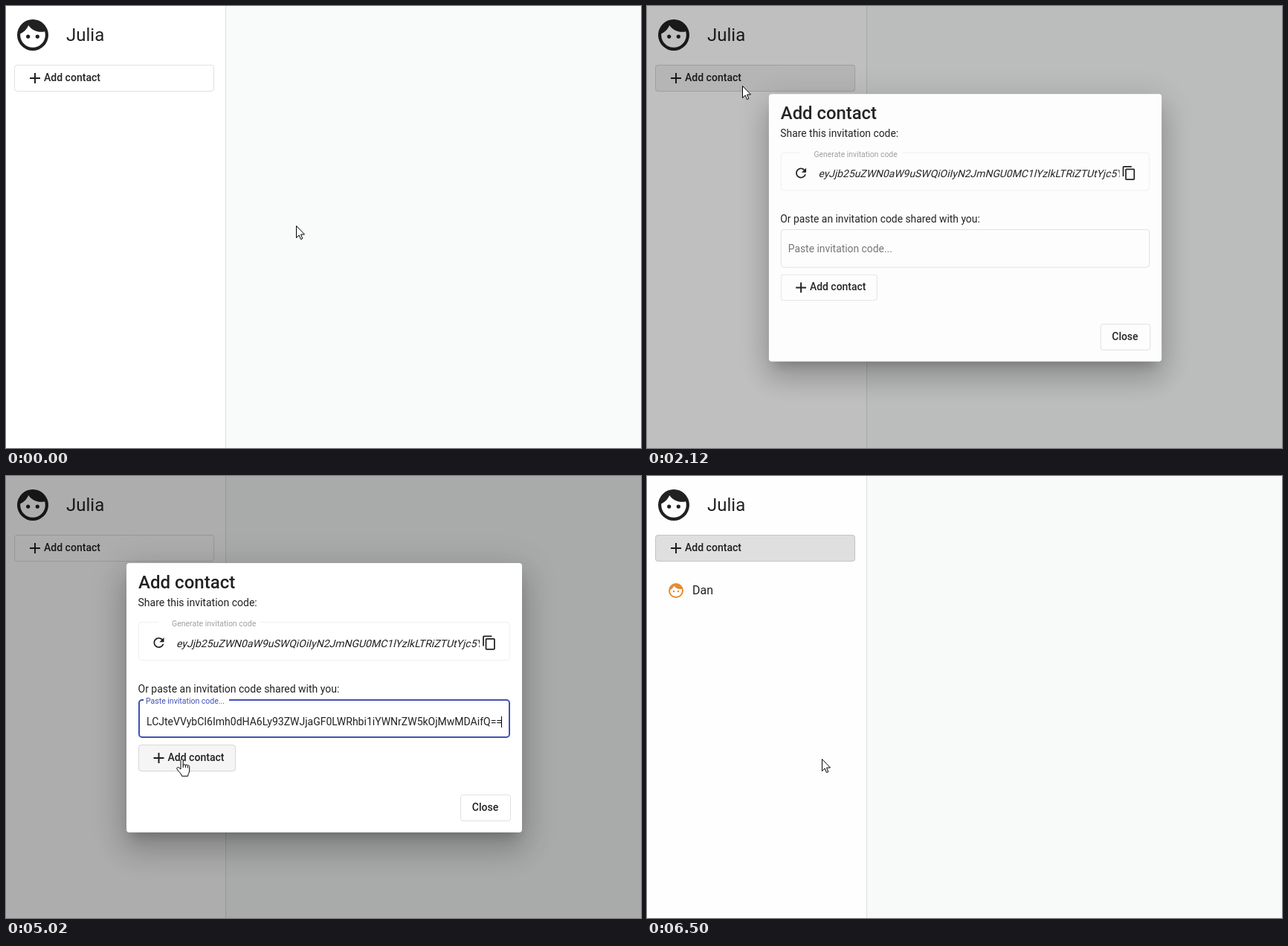
Animation of 854x594 px, one loop 8.3 s. Source, as an HTML page:

```html
<!DOCTYPE html>
<html lang="en">
<head>
<meta charset="utf-8">
<title>Add contact</title>
<style>
  html, body { margin: 0; width: 100%; height: 100%; overflow: hidden; background: #f9fafa; }
  body { position: relative; font: 14px Roboto, sans-serif; }
  body > svg, #backdrop { position: absolute; left: 0; top: 0; width: 854px; height: 594px; }
  #backdrop { background: #000; }
  #dialog {
    position: absolute; left: 162px; top: 117px; width: 532px; height: 362px;
    background: #fff; border-radius: 4px;
    box-shadow: 0 11px 15px -7px #0003, 0 24px 38px 3px #00000024, 0 9px 46px 8px #0000001f;
  }
  #dialog > svg { display: block; }
  text, .icon { fill: rgba(0, 0, 0, .87); }
  .strong { font-weight: 500; }
  .border { fill: none; stroke: rgba(0, 0, 0, .12); }
  .outline { fill: none; }
  #cursor path { fill: #fff; stroke: #000; stroke-linejoin: round; }
</style>
</head>
<body>
<svg viewBox="0 0 854 594">
  <defs>
    <path id="plus" d="M19 13h-6v6h-2v-6H5v-2h6V5h2v6h6v2z"/>
    <path id="face" d="M9 11.75a1.25 1.25 0 1 0 0 2.5 1.25 1.25 0 0 0 0-2.5zm6 0a1.25 1.25 0 1 0 0 2.5 1.25 1.25 0 0 0 0-2.5zM12 2a10 10 0 1 0 0 20 10 10 0 0 0 0-20zm0 18c-4.41 0-8-3.59-8-8 0-.29.02-.58.05-.86 2.36-1.05 4.23-2.98 5.21-5.37C11.07 8.33 14.05 10 17.42 10c.78 0 1.53-.09 2.25-.26.21.71.33 1.47.33 2.26 0 4.41-3.59 8-8 8z"/>
  </defs>
  <path fill="#fff" d="M0 0h295v594H0z"/>
  <path fill="#dedede" d="M295 0h1v594h-1z"/>
  <use href="#face" fill="#212121" transform="translate(10.8 13.8) scale(2.1)"/>
  <text x="81" y="47" font-size="24">Julia</text>
  <svg id="openButton" x="11" y="79" width="269" height="36">
    <rect class="overlay" width="269" height="36" rx="4"/>
    <circle class="ripple" cx="117" cy="28"/>
    <rect class="border" x=".5" y=".5" width="268" height="35" rx="3.5"/>
    <use href="#plus" class="icon" x="16" y="6"/>
    <text class="strong" x="40" y="22">Add contact</text>
  </svg>
  <g id="contact">
    <use href="#face" fill="#e88c30" x="27" y="142"/>
    <text x="61" y="159" font-size="16">Dan</text>
  </g>
</svg>

<div id="backdrop"></div>

<div id="dialog">
  <svg viewBox="162 117 532 362" width="532" height="362">
    <text class="strong" x="178" y="151" font-size="24">Add contact</text>
    <text x="177.5" y="175">Share this invitation code:</text>

    <path id="codeOutline" class="outline" stroke="rgba(0,0,0,.06)"/>
    <text x="223" y="202" font-size="10.5" style="fill:rgba(0,0,0,.38)">Generate invitation code</text>
    <path class="icon" transform="translate(195 213.5) scale(.875)" d="M17.65 6.35C16.2 4.9 14.21 4 12 4c-4.42 0-7.99 3.58-7.99 8s3.57 8 7.99 8c3.73 0 6.84-2.55 7.73-6h-2.08c-.82 2.33-3.04 4-5.65 4-3.31 0-6-2.69-6-6s2.69-6 6-6c1.66 0 3.14.69 4.22 1.78L13 11h7V4l-2.35 2.35z"/>
    <svg x="226" y="210" width="411" height="30">
      <!-- slanted upright face, not the narrower true italic -->
      <text transform="translate(3 20) skewX(-14)">eyJjb25uZWN0aW9uSWQiOiIyN2JmNGU0MC1lYzlkLTRiZTUtYjc5Yi</text>
    </svg>
    <path class="icon" transform="translate(639.4 213.5) scale(.875)" d="M16 1H4c-1.1 0-2 .9-2 2v14h2V3h12V1zm3 4H8c-1.1 0-2 .9-2 2v14c0 1.1.9 2 2 2h11c1.1 0 2-.9 2-2V7c0-1.1-.9-2-2-2zm0 16H8V7h11v14z"/>

    <text x="177.5" y="291">Or paste an invitation code shared with you:</text>
    <path id="thinOutline" class="outline" stroke="rgba(0,0,0,.12)"/>
    <path id="thickOutline" class="outline" stroke-width="2"/>
    <text id="label">Paste invitation code...</text>
    <svg x="188" y="315" width="479" height="30">
      <text id="codeStart" y="20">eyJjb25uZWN0aW9uSWQiOiJiMmZiZmVkNi1jYTQ4LTQ3NjMtOWM1YS03YWQx</text>
      <text id="codeEnd" x="479" y="20" text-anchor="end">iLCJteVVybCI6Imh0dHA6Ly93ZWJjaGF0LWRhbi1iYWNrZW5kOjMwMDAifQ==</text>
    </svg>
    <rect id="caret" y="323" width="1" height="15"/>

    <svg id="addButton" x="178" y="361" width="131" height="36">
      <rect class="overlay" width="131" height="36" rx="4"/>
      <circle class="ripple" cx="59" cy="20"/>
      <rect class="border" x=".5" y=".5" width="130" height="35" rx="3.5"/>
      <use href="#plus" class="icon" x="15.5" y="6"/>
      <text class="strong" x="39.5" y="22">Add contact</text>
    </svg>
    <rect class="border" x="611.5" y="428.5" width="67" height="35" rx="3.5"/>
    <text class="strong" x="644.5" y="450" text-anchor="middle">Close</text>
  </svg>
</div>

<svg viewBox="0 0 854 594">
  <g id="cursor">
    <path id="arrow" d="M.5 .5V16.5L4.2 13 6.5 18.5 8.8 17.6 6.6 12H11.5z"/>
    <path id="hand" d="M0 14V2.2a1.6 1.6 0 0 1 3.2 0V9c.3-1.8 3-1.8 3.2 0 .3-1.5 2.7-1.3 2.9.5 .3-1.2 2.4-1 2.4 1V16c0 3-2 4-2 7.3H1.5C1 20-3 17.5-5 13.8-6 11.8-3.6 10.8-2.2 12zM3.2 9v3M6.4 9v3M9.3 9.5v3"/>
    <path id="beam" style="fill:none" d="M-3-7.5H-.5L.5-6.5 1.5-7.5H4M.5-6.5V6.5M-3 7.5H-.5L.5 6.5 1.5 7.5H4"/>
  </g>
</svg>

<script>
const LOOP = 8300;
const CLICK_OPEN = 1830, OPEN = 2001, FOCUS = 3100, PASTE = 3830, BLUR = 5940, CLOSE = 6186, CLOSED = 6262;

// The screen refreshes in bursts: [first, last, count]
const bursts = [[680, 1520, 13], [1850, 2680, 13], [2750, 2970, 4], [3110, 3870, 10],
  [4400, 5020, 9], [5420, 5420, 1], [5950, 6500, 9]];
const refreshes = [0, ...bursts.flatMap(([first, last, count]) =>
  Array.from({ length: count }, (_, i) =>
    first + Math.floor(i * (last - first) / Math.max(1, count - 1) / 10) * 10))];

// [time, x, y]
const pointerPath = [[640, 390, 295], [1450, 128, 107], [2150, 128, 107], [2680, 225, 300],
  [2970, 234, 332], [4340, 234, 332], [5020, 235, 380], [LOOP, 235, 380]];

const $ = id => document.getElementById(id);
const clamp = v => Math.min(1, Math.max(0, v));
const mix = (a, b, p) => a + (b - a) * p;

function bezier(x1, y1, x2, y2) {
  const at = (a, b, s) => 3 * (1 - s) ** 2 * s * a + 3 * (1 - s) * s * s * b + s ** 3;
  return x => {
    let low = 0, high = 1;
    for (let i = 0; i < 24; i++) {
      const mid = (low + high) / 2;
      if (at(x1, x2, mid) < x) low = mid; else high = mid;
    }
    return at(y1, y2, high);
  };
}
const swift = bezier(.25, .8, .25, 1);
const decelerate = bezier(0, 0, .2, 1);
const standard = bezier(.4, 0, .2, 1);
const smooth = bezier(.4, 0, .6, 1);
const tween = (t, start, duration, ease = swift) => ease(clamp((t - start) / duration));

function outline(x, y, w, h, inset, gapStart, gapEnd) {
  const r = 4, left = x + inset, top = y + inset, right = x + w - inset, bottom = y + h - inset;
  return `M${gapEnd} ${top}H${right - r}a4 4 0 0 1 4 4V${bottom - r}a4 4 0 0 1-4 4` +
    `H${left + r}a4 4 0 0 1-4-4V${top + r}a4 4 0 0 1 4-4H${gapStart}`;
}

function drawButton(button, t, shade, press, radius) {
  button.querySelector(".overlay").setAttribute("opacity", shade);
  const ripple = button.querySelector(".ripple");
  ripple.setAttribute("r", radius * tween(t, press, 225, decelerate));
  ripple.setAttribute("opacity", t < press ? 0 : .1 * (1 - tween(t, press + 225, 400, decelerate)));
}

function drawField(t) {
  const focused = t >= FOCUS && t < BLUR;
  const floating = tween(t, FOCUS, 400);
  const gapEnd = t >= FOCUS ? 300 : 185;
  const thick = tween(t, 2700, 250) * (1 - tween(t, BLUR, 200));
  $("thinOutline").setAttribute("d", outline(178, 300, 500, 52, .5, 185, gapEnd));
  $("thinOutline").setAttribute("opacity", 1 - thick);
  $("thickOutline").setAttribute("d", outline(178, 300, 500, 52, 1, 185, gapEnd));
  $("thickOutline").setAttribute("stroke", t < FOCUS ? "rgba(0,0,0,.87)" : "#3f51b5");
  $("thickOutline").setAttribute("opacity", thick);

  $("label").setAttribute("transform",
    `translate(188 ${mix(331, 306, floating)}) scale(${mix(1, .75, floating)})`);
  $("label").style.fill = focused ? "#3f51b5" : "rgba(0,0,0,.54)";
  $("codeEnd").setAttribute("opacity", +(t >= PASTE && t < BLUR));
  $("codeStart").setAttribute("opacity", +(t >= BLUR));

  const pasted = t >= PASTE;
  const blinkOn = Math.floor((t - (pasted ? PASTE : FOCUS)) / 530) % 2 === 0;
  $("caret").setAttribute("x", pasted ? 666 : 188);
  $("caret").setAttribute("opacity", +(focused && blinkOn));
}

function drawPointer(t) {
  const next = pointerPath.findIndex(([time]) => time > t);
  const [end, toX, toY] = pointerPath[next];
  const [start, fromX, fromY] = pointerPath[Math.max(0, next - 1)];
  const p = tween(t, start, end - start || 1, smooth);
  const x = mix(fromX, toX, p), y = mix(fromY, toY, p);
  $("cursor").setAttribute("transform", `translate(${Math.round(x)} ${Math.round(y)})`);

  const dialogUp = t >= OPEN && t < CLOSED;
  const overButton = dialogUp ? y > 361 : y < 115 && t < OPEN;
  const shape = overButton ? "hand" : dialogUp && t > 2700 && y > 304 && y < 352 ? "beam" : "arrow";
  for (const id of ["arrow", "hand", "beam"]) $(id).setAttribute("opacity", +(id === shape));
}

function draw(t) {
  const appear = tween(t, OPEN, 150, decelerate);
  $("backdrop").style.opacity = .32 * (tween(t, OPEN, 400) - tween(t, CLOSE, 400));
  $("dialog").style.opacity = appear * (1 - tween(t, CLOSE, 75, standard));
  $("dialog").style.transform = appear < 1 ? `scale(${mix(.7, 1, appear)})` : "none";

  const openHover = .04 * (tween(t, 1380, 140) - tween(t, OPEN, 200));
  drawButton($("openButton"), t, openHover + .12 * tween(t, CLOSED, 200), CLICK_OPEN, 155);
  drawButton($("addButton"), t, .04 * tween(t, 4750, 200), BLUR, 74);
  $("contact").setAttribute("opacity", +(t >= CLOSED));
  drawField(t);
  drawPointer(t);
}

$("codeOutline").setAttribute("d", outline(178, 196, 500, 52, .5, 205, 342));

const began = performance.now();
function frame() {
  const t = Math.max(0, performance.now() - began) % LOOP;
  draw(refreshes.findLast(time => time <= t));
  requestAnimationFrame(frame);
}
frame();
</script>
</body>
</html>
```
